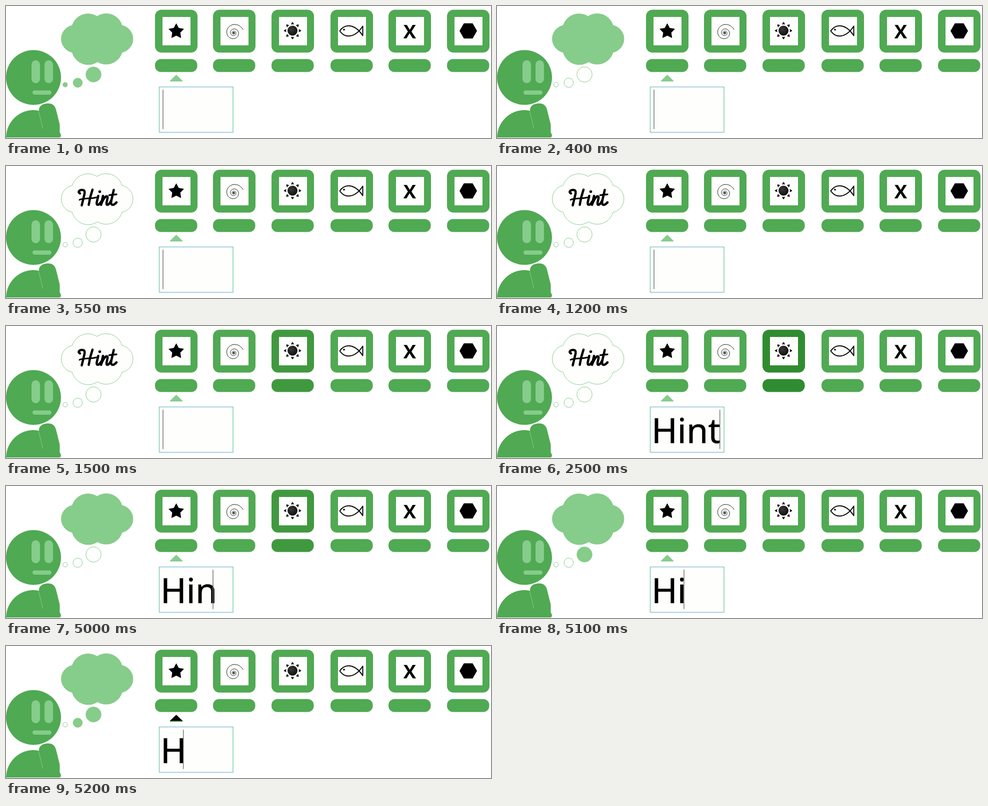
An HTML page for the animation above (5300 ms loop, 970x265 px).

```html
<!DOCTYPE html>
<html lang="en">
<head>
<meta charset="utf-8">
<title>Hint prompt</title>
<style>
  html, body { margin: 0; width: 100%; height: 100%; overflow: hidden; background: #fff; }
  svg { display: block; width: 970px; height: 265px; }
  .green { fill: #50a953; }
  .light { fill: #86cc8a; }
  .paper { fill: #fefefd; }
  .bubble { stroke: #86cc8a; stroke-width: 1; }
  .line { fill: none; stroke: #000; stroke-linecap: round; stroke-linejoin: round; }
  .typed { font: 70px "Noto Sans", "Open Sans", sans-serif; stroke: #000; stroke-width: .5; }
  .letter { font: 700 38px "Noto Sans", "Open Sans", sans-serif; text-anchor: middle; }
</style>
</head>
<body>
<svg viewBox="0 0 970 265">
  <defs>
    <radialGradient id="glow" cx=".4" cy=".35" r=".7">
      <stop offset="0" stop-color="#3a3a3a"/>
      <stop offset="1" stop-color="#0c0c0c"/>
    </radialGradient>
  </defs>

  <g id="person">
    <circle class="green" cx="55" cy="143.5" r="55"/>
    <rect class="light" x="51" y="109" width="17" height="46" rx="8.5"/>
    <rect class="light" x="77" y="109" width="17" height="46" rx="8.5"/>
    <rect class="light" x="53" y="169.5" width="38" height="8.5" rx="4.2"/>
    <path class="green" d="M0 264C1 233 25 209 55 209C59 209 62 209.500 66 210.500
      C65 201 73 195.500 84 195.500C93 195.500 98 200 100 208L107.500 238V254Q110 257 110 260Q110 264 106 264Z"/>
    <path d="M65.500 212Q67 220 69.500 228L73.500 246" fill="none" stroke="#86cc8a" stroke-width="1"/>
  </g>

  <path id="cloud" class="bubble" d="M132.500 39A33 33 0 0 1 182 21A33 33 0 0 1 232 39
    A27.600 27.600 0 0 1 232 93A33 33 0 0 1 183 112A33 33 0 0 1 132.500 93A27.600 27.600 0 0 1 132.500 39Z"/>
  <circle id="big" class="bubble" cx="175" cy="137.500" r="15.300"/>
  <circle id="medium" class="bubble" cx="143.500" cy="154" r="9.300"/>
  <circle id="small" class="bubble" cx="118.300" cy="158" r="4.600"/>

  <g id="script" class="line" role="img" aria-label="Hint" stroke-width="4.600">
    <path d="M148 55C143 53 146 48 152 48C157 48 158 51 157 56L151.500 79"/>
    <path d="M173 47.500C170 56 167 67 165.500 78"/>
    <path d="M147 68C153 64 171 66 181 63" stroke-width="3"/>
    <path d="M184.500 60L181.500 73C180.500 80 186 79 190 72"/>
    <path d="M187.500 51.500V51.600" stroke-width="5.500"/>
    <path d="M194 60L190 78C193 69 198 60 202 61C205 62 201 71 201 75C201 81 207 77 210 70"/>
    <path d="M215.500 48L210.500 70C208.500 80 215 80 221 73"/>
    <path d="M206.500 58.500L221 57" stroke-width="3.400"/>
  </g>

  <g id="cards"></g>

  <path id="arrow" d="M340.500 138L353 150V151.500H328V150Z"/>
  <path id="arrowBase" d="M329 151H352" stroke="#50a953" stroke-width="1.500"/>

  <rect class="paper" x="306.500" y="162.500" width="147.500" height="91"/>
  <path d="M306 162.500H454.500M306 253.500H454.500" stroke="#62a9c9"/>
  <path d="M306.500 162V254M454 162V254" stroke="#62c39b" stroke-width="1.200"/>
  <text id="typed" class="typed" x="309" y="235"></text>
  <path id="caret" d="M0 168V247" stroke="#777" stroke-width="1.500"/>
</svg>

<script>
const LOOP = 5300;
const GREEN = "#50a953", MID = "#41993f", DARK = "#308c30", LIGHT = "#86cc8a", PAPER = "#fefefd";
const WORD = "Hint";
const CARETS = [314, 354.7, 374, 414, 445.7];
const $ = id => document.getElementById(id);

const polar = (radius, angle) =>
  `${(radius * Math.cos(angle)).toFixed(2)},${(radius * Math.sin(angle)).toFixed(2)}`;

function polygon(count, radiusAt, start = 0) {
  const points = Array.from({ length: count }, (_, i) =>
    polar(radiusAt(i), start + i * 2 * Math.PI / count));
  return points.join(" ");
}

function star() {
  const points = polygon(10, i => i % 2 ? 8 : 15.5, -Math.PI / 2);
  return `<polygon transform="translate(0 1)" points="${points}" stroke="#000" stroke-linejoin="round"/>`;
}

function spiral() {
  const points = [];
  for (let turn = 0; turn < 3.5; turn += 0.02) {
    points.push(polar(19.5 * Math.exp(-0.75 * turn), -0.35 - turn * 2 * Math.PI));
  }
  return `<g transform="translate(-1 4)"><polyline class="line" stroke-width=".9" points="${points.join(" ")}"/>
    <circle r="1.5"/></g>`;
}

function sun() {
  let rays = "";
  for (let i = 0; i < 8; i++) {
    rays += `<path transform="rotate(${i * 45})" d="M12 -3Q14 0 12 3Q16 2 17.500 0Q16 -2 12 -3Z"/>`;
  }
  return `<g transform="translate(-.5 -.5)"><circle r="10" fill="url(#glow)"/>${rays}</g>`;
}

const fish = () => `<path class="line" stroke-width="2"
  d="M-24 0C-14 -15 6 -15 22 9.500V-9.500C6 15 -14 15 -24 0Z"/><circle cx="-15.500" cy="-2.500" r="1.800"/>`;

const letter = () => `<text class="letter" y="15">X</text>`;

const hexagon = () => `<polygon points="${polygon(6, () => 17.5)}"/>`;

const cardXs = [298, 414, 531, 649, 765, 882];
const icons = [star, spiral, sun, fish, letter, hexagon];
$("cards").innerHTML = cardXs.map((x, i) => `
  <g class="card" transform="translate(${x} 0)" fill="${GREEN}">
    <rect y="7.500" width="85" height="86" rx="13"/>
    <rect y="106.500" width="84.500" height="26" rx="12"/>
    <rect class="paper" x="15" y="22" width="56" height="57"/>
    <g transform="translate(42.500 50)" fill="#000">${icons[i]()}</g>
  </g>`).join("");
const chosenCard = document.querySelectorAll(".card")[2];

const within = (t, from, to) => t >= from && t < to;

function typedCount(t) {
  if (t < 2200) return 0;
  if (t < 5000) return Math.min(WORD.length, 1 + Math.floor((t - 2200) / 100));
  return 3 - Math.floor((t - 5000) / 100);
}

function cardColor(t) {
  if (within(t, 1600, 5000)) return DARK;
  return within(t, 1500, 5100) ? MID : GREEN;
}

function draw(t) {
  const openTimes = { small: [100, LOOP], medium: [250, 5200], big: [400, 5100], cloud: [550, 5000] };
  for (const [id, [from, to]] of Object.entries(openTimes)) {
    $(id).setAttribute("fill", within(t, from, to) ? PAPER : LIGHT);
  }
  $("script").setAttribute("visibility", within(t, 550, 5000) ? "visible" : "hidden");

  const pressed = within(t, 1050, 1200) || t >= 5200;
  $("arrow").setAttribute("fill", pressed ? "#000" : LIGHT);
  $("arrowBase").setAttribute("visibility", pressed ? "visible" : "hidden");
  chosenCard.setAttribute("fill", cardColor(t));

  const count = typedCount(t);
  $("typed").textContent = WORD.slice(0, count);
  $("caret").setAttribute("transform", `translate(${CARETS[count]} 0)`);
}

const start = performance.now();
function tick() {
  draw((performance.now() - start) % LOOP);
  requestAnimationFrame(tick);
}
tick();
</script>
</body>
</html>
```
